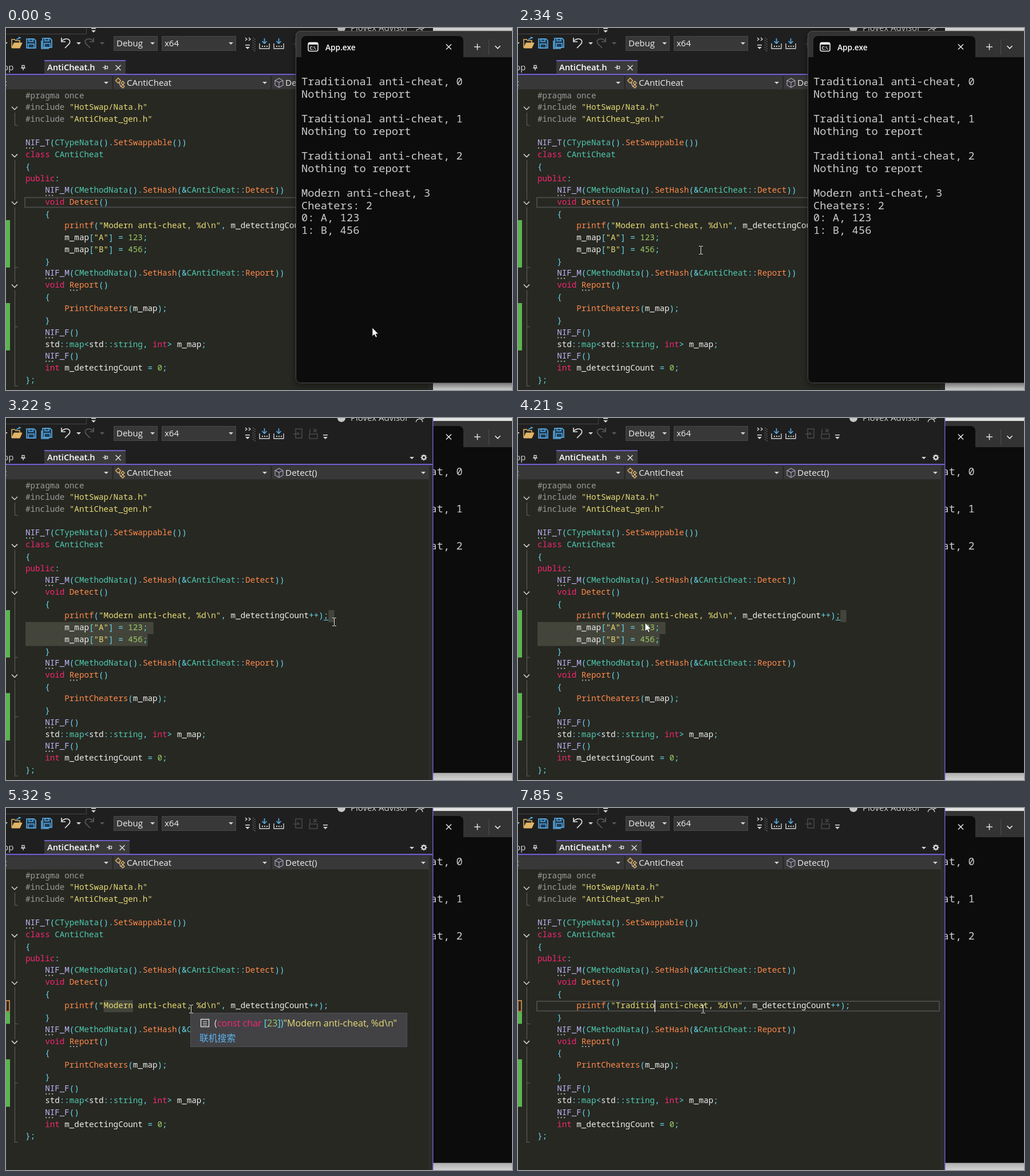
Recreate the animation shown at these times as an HTML page with a canvas. Size 884 px wide and 633 px high, loop 8000 ms.

```html
<!DOCTYPE html>
<html lang="en">
<head>
<meta charset="utf-8">
<title>Editing beside a console</title>
<style>
html, body { margin: 0; width: 100%; height: 100%; overflow: hidden; background: #1f1f1f; }
canvas { display: block; }
</style>
</head>
<body>
<canvas id="stage" width="884" height="633"></canvas>
<script>
const ctx = document.getElementById('stage').getContext('2d');
const LOOP = 8000, FOCUS = 2450, PRESS = 2480, DELETE = 4300, SELECT_WORD = 4800, TIP = 5240;
const TYPED = [5650, 5930, 6140, 6750, 7040, 7270, 7690, 7850];
const MONO = '"Noto Sans Mono", monospace';
const UI = '"Open Sans", "Noto Sans CJK SC", "Noto Sans CJK", sans-serif';
const CODE_X = 34, CHAR = 8.538, ROW = 20.72, CODE_TOP = 108;
const COLORS = {
  keyword: '#f92672', type: '#4ec9b0', macro: '#bdb4f5', func: '#ff8a4c', number: '#9ccc65',
  string: '#e6db74', gray: '#9b9b9b', punct: '#66d9ef', name: '#eeeeee'
};
const HEAD = [
  '#pragma once', '#include "HotSwap/Nata.h"', '#include "AntiCheat_gen.h"', '',
  'NIF_T(CTypeNata().SetSwappable())', 'class CAntiCheat', '{', 'public:',
  '    NIF_M(CMethodNata().SetHash(&CAntiCheat::Detect))', '    void Detect()', '    {'
];
const MAPPING = ['        m_map["A"] = 123;', '        m_map["B"] = 456;'];
const TAIL = [
  '    }', '    NIF_M(CMethodNata().SetHash(&CAntiCheat::Report))', '    void Report()', '    {',
  '        PrintCheaters(m_map);', '    }', '    NIF_F()', '    std::map<std::string, int> m_map;',
  '    NIF_F()', '    int m_detectingCount = 0;', '};'
];
const CONSOLE = [
  'Traditional anti-cheat, 0', 'Nothing to report', '', 'Traditional anti-cheat, 1', 'Nothing to report', '',
  'Traditional anti-cheat, 2', 'Nothing to report', '', 'Modern anti-cheat, 3', 'Cheaters: 2', '0: A, 123', '1: B, 456'
];
// time, x, y
const POINTER = [
  [870, 640, 524], [1200, 572, 489], [1520, 465, 441], [1650, 372, 405], [1950, 328, 391], [2450, 316, 387],
  [2510, 316, 387], [2900, 420, 372], [3340, 630, 350], [3620, 630, 350], [3900, 440, 356], [4210, 222, 358],
  [4410, 210, 352], [4590, 200, 350], [4800, 203, 357], [4970, 203, 357], [5030, 265, 341], [5080, 323, 351]
];

const rowTop = i => CODE_TOP + i * ROW;
const colX = c => CODE_X + c * CHAR;

function rect(x, y, w, h, color) {
  ctx.fillStyle = color;
  ctx.fillRect(x, y, w, h);
}

function frame(x, y, w, h, color, width = 1) {
  ctx.strokeStyle = color;
  ctx.lineWidth = width;
  ctx.strokeRect(x, y, w, h);
}

function round(x, y, w, h, radii, color) {
  ctx.fillStyle = color;
  ctx.beginPath();
  ctx.roundRect(x, y, w, h, radii);
  ctx.fill();
}

function path(points, color, width = 1.5, fill) {
  ctx.beginPath();
  for (let i = 0; i < points.length; i += 2) ctx.lineTo(points[i], points[i + 1]);
  if (fill) {
    ctx.closePath();
    ctx.fillStyle = fill;
    ctx.fill();
  }
  if (color) {
    ctx.strokeStyle = color;
    ctx.lineWidth = width;
    ctx.stroke();
  }
}

function label(text, x, y, size = 15, color = '#f0f0f0', weight = 400, family = UI) {
  ctx.font = `${weight} ${size}px ${family}`;
  ctx.fillStyle = color;
  ctx.fillText(text, x, y);
  return x + ctx.measureText(text).width;
}

const dropArrow = (x, y, color = '#d6d6d6') => path([x - 4, y - 2, x + 4, y - 2, x, y + 2], null, 0, color);
const chevron = (x, y, r, color) => path([x - r, y - r / 2, x, y + r / 2, x + r, y - r / 2], color, 1.6);

function cross(x, y, r, color) {
  path([x - r, y - r, x + r, y + r], color, 1.4);
  path([x - r, y + r, x + r, y - r], color, 1.4);
}

function pin(x, y, upright) {
  ctx.save();
  ctx.translate(x, y);
  if (upright) ctx.rotate(-Math.PI / 2);
  path([-5, 0, -1, 0], '#dddddd', 1.3);
  path([-1, -4, -1, 4], '#dddddd', 1.3);
  frame(-0.5, -2, 4, 4, '#dddddd', 1.3);
  ctx.restore();
}

function disk(x, y) {
  path([x, y, x + 13, y, x + 16, y + 3, x + 16, y + 16, x, y + 16, x, y], '#59aee8', 1.6, '#203a50');
  frame(x + 4, y + 0.5, 7, 4, '#59aee8', 1.4);
  frame(x + 3, y + 9, 10, 7, '#59aee8', 1.4);
}

function turnArrow(x, dir, color) {
  ctx.strokeStyle = color;
  ctx.lineWidth = 1.7;
  ctx.beginPath();
  ctx.moveTo(x, 23);
  ctx.bezierCurveTo(x + dir * 9, 14, x + dir * 20, 22, x + dir * 12, 29);
  ctx.lineTo(x + dir * 6, 35);
  ctx.stroke();
  path([x, 17, x, 24, x + dir * 7, 24], color, 1.7);
}

function overflow(x, y) {
  rect(x - 4, y - 4, 8, 1.5, '#dddddd');
  dropArrow(x, y + 2);
}

function buildIcon(x) {
  path([x, 27, x, 36, x + 17, 36, x + 17, 27], '#d0d0d0', 1.4);
  for (const dx of [4, 8, 12]) rect(x + dx, 31, 2, 2, '#d0d0d0');
  path([x + 8.5, 18, x + 8.5, 27], '#59aee8', 1.6);
  path([x + 4.5, 23, x + 8.5, 27, x + 12.5, 23], '#59aee8', 1.6);
}

function toolbar() {
  rect(0, 0, 746, 83, '#1f1f1f');
  path([0, 10.5, 140.5, 10.5, 140.5, 0], '#484848', 1);
  overflow(153, 4);
  ctx.fillStyle = '#c8c8c8';
  ctx.beginPath();
  ctx.arc(586, 0, 7, 0, 7);
  ctx.fill();
  label('Plovex Advisor', 602, 5, 15, '#d2d2d2');
  path([716, 7, 718, 3, 723, 1, 727, 4, 728, 7], '#cccccc', 1.4);
  path([725, 2, 731, 0], '#cccccc', 1.4);

  dropArrow(-1, 27);
  path([10, 34, 10, 20, 15, 20, 17, 22, 24, 22, 24, 26], '#e0b568', 1.5);
  path([10, 35, 14, 26, 28, 26, 24, 35], '#e0b568', 1, '#e0b568');
  path([18, 20, 25, 17, 22, 16], '#59aee8', 1.4);
  disk(36, 19);
  disk(64, 18);
  path([62, 22, 62, 36, 75, 36], '#59aee8', 1.6);
  turnArrow(97, 1, '#e0e0e0');
  dropArrow(127, 27);
  turnArrow(153, -1, '#5a5a5a');
  dropArrow(168, 27, '#5a5a5a');
  for (const [x, w, text] of [[188, 77, 'Debug'], [272, 130, 'x64']]) {
    rect(x, 14, w, 26, '#383838');
    frame(x + 0.5, 14.5, w - 1, 25, '#484848');
    label(text, x + 5, 32);
    dropArrow(x + w - 9, 27);
  }
  for (const x of [418, 424]) path([x, 17, x + 3, 19.5, x, 22], '#dddddd', 1.3);
  rect(418, 29, 8, 1.5, '#dddddd');
  dropArrow(422, 35);
  for (let y = 17; y < 38; y += 4) {
    rect(431, y, 1.5, 1.5, '#707070');
    rect(434, y + 2, 1.5, 1.5, '#707070');
  }
  buildIcon(443);
  buildIcon(468);
  frame(506, 19, 11, 16, '#4c4c4c', 1.4);
  path([502, 28, 512, 28, 509, 25], '#4c4c4c', 1.4);
  frame(530, 28, 14, 8, '#4c4c4c', 1.4);
  cross(540, 22, 3, '#4c4c4c');
  path([531, 19, 531, 27], '#4c4c4c', 1.4);
  overflow(558, 33);
}

function tabs(modified) {
  const shift = modified ? 7 : 0;
  label('pp', -5, 74, 15, '#d8d8d8');
  pin(30, 69, true);
  rect(67, 56, 142 + shift, 25, '#3a3a3a');
  rect(67, 56, 142 + shift, 2, '#6c5fc4');
  label('AntiCheat.h' + (modified ? '*' : ''), 72, 74, 14.7, '#ffffff', 600);
  pin(174 + shift, 69);
  cross(196 + shift, 69.5, 4.5, '#e0e0e0');
  dropArrow(709, 70);
  ctx.strokeStyle = '#d6d6d6';
  ctx.lineWidth = 2.4;
  ctx.beginPath();
  ctx.arc(730, 69, 3.2, 0, 7);
  ctx.stroke();
  for (let i = 0; i < 8; i++) {
    const a = i * Math.PI / 4;
    path([730 + 3 * Math.cos(a), 69 + 3 * Math.sin(a), 730 + 5.5 * Math.cos(a), 69 + 5.5 * Math.sin(a)], '#d6d6d6', 1.6);
  }
  rect(0, 80, 746, 2.5, '#6c5fc4');
}

function navigation() {
  rect(0, 83, 746, 25, '#2b2b2b');
  for (const [x, w] of [[0, 185], [188, 274], [465, 274]]) {
    rect(x, 84, w, 23, '#383838');
    dropArrow(x + w - 10, 96);
  }
  label(':', -2, 101);
  for (const [x, y, s] of [[196, 92, 4.5], [204, 96, 3], [204, 102, 3]])
    path([x - s, y, x, y - s, x + s, y, x, y + s, x - s, y], '#e0b568', 1.3, '#4b4231');
  path([198, 95, 200, 102, 202, 102], '#d0d0d0', 1.2);
  label('CAntiCheat', 211, 101);
  path([470, 92, 477, 88, 484, 92, 484, 100, 477, 104, 470, 100, 470, 92, 477, 95, 484, 92], '#a9a0bb', 1.2);
  path([477, 95, 477, 104], '#a9a0bb', 1.2);
  label('Detect()', 488, 101, 15.3);
}

function colorOf(token) {
  if (/^#/.test(token) || token === 'once') return COLORS.gray;
  if (token[0] === '"') return COLORS.string;
  if (/^(class|public|void|int)$/.test(token)) return COLORS.keyword;
  if (/^NIF_/.test(token)) return COLORS.macro;
  if (/^(C[A-Z]\w+|map|string)$/.test(token)) return COLORS.type;
  if (/^(Set\w+|Detect|Report|printf|PrintCheaters)$/.test(token)) return COLORS.func;
  if (/^\d/.test(token)) return COLORS.number;
  return /^\w/.test(token) ? COLORS.name : COLORS.punct;
}

function codeLine(text, row) {
  const base = rowTop(row) + 14.5;
  for (const m of text.matchAll(/"[^"]*"|#?\w+|[^\w\s"#]+/g))
    label(m[0], colX(m.index), base, 14.23, colorOf(m[0]), 400, MONO);
  const hint = text.search(/NIF_|Report\(\)$/);
  if (hint >= 0)
    for (let i = 0; i < 3; i++) rect(colX(hint) + 1 + i * 5.5, base + 3.5, 2, 2, '#b0b0b0');
}

function margin(cut) {
  const green = (row, count) => rect(0, rowTop(row), 7, count * ROW, '#5bb450');
  if (cut) {
    frame(0, rowTop(11) + 1, 6, ROW - 2, '#e09a50', 1.6);
    green(12, 1);
    green(16, 4);
  } else {
    green(11, 4);
    green(18, 4);
  }
  const gone = cut ? 2 : 0;
  const guide = (from, to) => path([15.5, rowTop(from), 15.5, rowTop(to)], '#626262', 1);
  const tick = row => path([15, rowTop(row), 21, rowTop(row)], '#626262', 1);
  guide(1.9, 3);
  guide(5.9, 25 - gone);
  [3, 15 - gone, 20 - gone, 25 - gone].forEach(tick);
  for (const row of [1, 5, 9, 16 - gone]) {
    rect(9, rowTop(row) + 6, 13, 13, '#272822');
    chevron(15, rowTop(row) + 11.5, 5, '#d0d0d0');
  }
}

function currentLine(row) {
  frame(33, rowTop(row) + 2, 703, 17, '#484848', 2);
}

function selectRow(row, from, to) {
  rect(colX(from), rowTop(row), (to - from) * CHAR, ROW + 0.5, '#43443a');
}

function tooltip() {
  rect(322, 358, 379, 60, '#424245');
  frame(322.5, 358.5, 378, 59, '#505054');
  frame(340.5, 369.5, 14, 13, '#d8d8d8', 1.5);
  for (const y of [373, 376, 379]) rect(344, y, 7, 1, '#d8d8d8');
  let x = 364;
  for (const [text, color] of [
    ['(', '#d8d8d8'], ['const char ', COLORS.keyword], ['[', COLORS.punct], ['23', COLORS.number],
    ['])', COLORS.punct], ['"Modern anti-cheat, %d\\n"', COLORS.string]
  ]) x = label(text, x, 381.5, 16.1, color);
  label('联机搜索', 338, 408, 15.8, '#5db2ee');
}

function editor(t, mouse) {
  const cut = t >= DELETE;
  const typed = TYPED.filter(at => t >= at).length;
  const dragging = t >= PRESS && !cut;
  const wordSelected = t >= SELECT_WORD && !typed;
  const last = t >= 3340 || mouse.y < rowTop(12) ? 11 : mouse.y < rowTop(13) ? 12 : 13;
  const word = typed ? 'Traditio'.slice(0, typed) : 'Modern';
  const printLine = `        printf("${word} anti-cheat, %d\\n", m_detectingCount++);`;

  rect(0, 83, 746, 550, '#272822');
  rect(738, 83, 8, 550, '#2c2c2e');
  toolbar();
  tabs(cut);
  navigation();
  margin(cut);

  if (t < PRESS) currentLine(9);
  else if (dragging && last === 13) currentLine(13);
  else if (cut && !wordSelected) currentLine(11);
  if (dragging && last < 13) {
    selectRow(13, 0, 25);
    if (last === 12) selectRow(12, 25, 26.2);
    else {
      selectRow(12, 0, 26.2);
      selectRow(11, 62, 63.2);
    }
  }
  if (wordSelected) selectRow(11, 16, 22);

  [...HEAD, printLine, ...(cut ? [] : MAPPING), ...TAIL].forEach(codeLine);
  if (dragging && last === 11) rect(colX(61), rowTop(11) + 17, CHAR, 1, COLORS.punct);

  const caret = col => rect(colX(col) - 0.5, rowTop(11), 1.6, ROW, '#e0e0e0');
  if (typed) {
    if ((t - TYPED[typed - 1]) % 1020 < 510) caret(16 + typed);
  } else if (wordSelected) {
    if (t < SELECT_WORD + 520) caret(22);
  } else if (cut && t < 4590) caret(62);

  if (t >= TIP && !typed) tooltip();
  if (t >= FOCUS) rect(745, 0, 1.5, 633, '#6c5fc4');
}

function desktop() {
  rect(0, 0, 884, 633, '#e2e2e2');
  const shade = ctx.createLinearGradient(0, 619, 0, 633);
  shade.addColorStop(0, '#a8a8a8');
  shade.addColorStop(1, '#d2d2d2');
  rect(746, 618, 138, 15, shade);
}

function terminal(front) {
  ctx.save();
  if (front) {
    ctx.shadowColor = 'rgba(0,0,0,0.45)';
    ctx.shadowBlur = 14;
    ctx.shadowOffsetY = 3;
  }
  round(506, 5, 400, 616, 8, '#0c0c0c');
  ctx.restore();
  round(506, 5, 400, 46, [8, 8, 0, 0], '#333333');
  round(516, 14, 283, 37, [8, 8, 0, 0], '#0c0c0c');
  rect(506, 51, 378, 5, '#0c0c0c');
  ctx.strokeStyle = '#505050';
  ctx.lineWidth = 1;
  ctx.beginPath();
  ctx.roundRect(506.5, 5.5, 400, 615, 8);
  ctx.stroke();

  ctx.strokeStyle = '#eeeeee';
  ctx.lineWidth = 1.6;
  ctx.beginPath();
  ctx.roundRect(528, 25.5, 17, 15, 3);
  ctx.stroke();
  rect(528, 26, 17, 3, '#eeeeee');
  label('C:\\', 530.5, 38, 8, '#eeeeee', 700);
  label('App.exe', 558, 38.5, 13.7, '#ffffff', 600);
  cross(773.5, 33, 4.5, '#eeeeee');
  path([818, 33, 829, 33], '#eeeeee', 1.4);
  path([823.5, 27.5, 823.5, 38.5], '#eeeeee', 1.4);
  path([843.5, 20, 843.5, 47], '#4c4c4c', 1);
  chevron(859, 33.5, 4.5, '#eeeeee');
  CONSOLE.forEach((line, i) => label(line, 516, 100 + i * 21.67, 18.8, '#cccccc', 400, MONO));
}

function pointerAt(t) {
  let i = POINTER.findIndex(p => p[0] > t);
  if (i === 0) i = 1;
  if (i < 0) i = POINTER.length - 1;
  const [t0, x0, y0] = POINTER[i - 1], [t1, x1, y1] = POINTER[i];
  const k = Math.min(1, Math.max(0, (t - t0) / (t1 - t0)));
  return { x: x0 + (x1 - x0) * k, y: y0 + (y1 - y0) * k };
}

function pointer(t, { x, y }) {
  const overConsole = t < FOCUS && x > 506;
  const overSelection = t > 3340 && t < DELETE && x < 257 && y > rowTop(12);
  ctx.save();
  ctx.translate(Math.round(x), Math.round(y));
  if (overConsole || overSelection) {
    path([0, 0, 0, 15, 3.5, 11.8, 6, 17, 8.3, 16, 6, 11, 10.5, 11, 0, 0], '#202020', 0.8, '#ffffff');
  } else {
    path([0.5, -6, 0.5, 7], '#e4e4e4', 1);
    for (const s of [-6.5, 7.5]) {
      path([-3, s, 0, s], '#e4e4e4', 1);
      path([1, s, 4, s], '#e4e4e4', 1);
    }
  }
  ctx.restore();
}

function draw(t) {
  const mouse = pointerAt(t);
  desktop();
  if (t < FOCUS) {
    editor(t, mouse);
    terminal(true);
  } else {
    terminal(false);
    editor(t, mouse);
  }
  pointer(t, mouse);
}

const start = performance.now();
function tick() {
  draw((performance.now() - start) % LOOP);
  requestAnimationFrame(tick);
}
tick();
</script>
</body>
</html>
```
